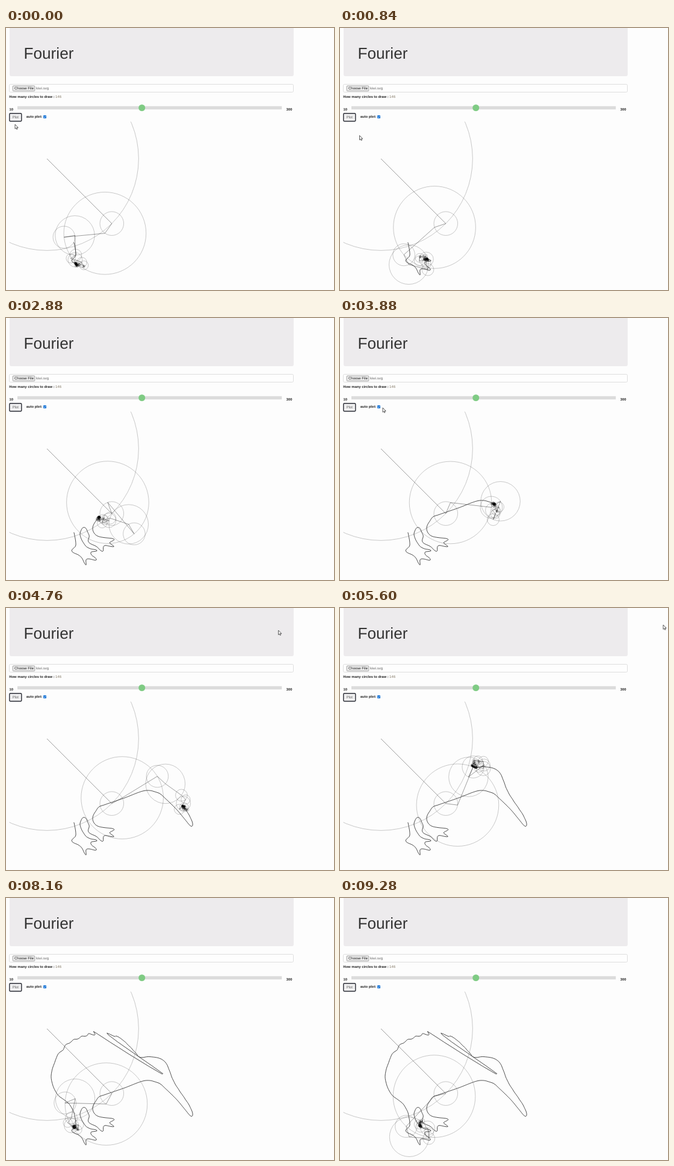
Animation, 545 px wide and 435 px high, one loop 9320 ms. Source, as an HTML page with a canvas:

```html
<!DOCTYPE html>
<html lang="en">
<head>
<meta charset="utf-8">
<title>Fourier</title>
<style>
  html, body { margin: 0; width: 100%; height: 100%; overflow: hidden; background: #fdfdfd; }
  canvas, svg { position: absolute; left: 0; top: 0; }
  text { font: 6px "Liberation Sans", Arial, sans-serif; fill: #333; text-rendering: geometricPrecision; }
  .bold { font-weight: bold; font-size: 5.85px; fill: #222; }
</style>
</head>
<body>
<canvas id="plot" width="545" height="435"></canvas>
<svg width="545" height="435" viewBox="0 0 545 435">
  <path d="M6 0H478V77a3 3 0 0 1 -3 3H9a3 3 0 0 1 -3 -3Z" fill="#edebed"/>
  <text x="29.5" y="51.2" style="font-size:26.2px">Fourier</text>

  <rect x="5.5" y="93.5" width="472" height="13" rx="2" fill="#fefefe" stroke="#dedede"/>
  <rect x="11.3" y="96" width="36.5" height="8.6" rx="1" fill="#efefef" stroke="#8a8a8a" stroke-width=".8"/>
  <text x="14" y="102.3" style="fill:#111">Choose File</text>
  <text x="50" y="102.3" style="fill:#666">kiwi.svg</text>

  <text class="bold" x="5.3" y="116.2">How many circles to draw :</text>
  <text x="82" y="116" style="fill:#857a68">146</text>
  <text class="bold" x="5.5" y="137">10</text>
  <text class="bold" x="465.7" y="137">300</text>
  <rect x="19" y="129.8" width="439.3" height="5.4" fill="#dcdcdc"/>
  <circle cx="225.8" cy="132.5" r="5.5" fill="#7fcb84"/>

  <rect x="5.8" y="141.8" width="20" height="13" rx="1.5" fill="#efeff0" stroke="#2b2d36" stroke-width="1.4"/>
  <text x="10.7" y="150.3" style="fill:#666">Plot</text>
  <text class="bold" x="33.7" y="149">auto plot:</text>
  <rect x="62" y="145" width="5" height="5" rx=".8" fill="#1673d6"/>
  <path d="M63 147.5l1.1 1.2 1.9 -2.4" fill="none" stroke="#fff" stroke-width=".8"/>

  <path id="cursor" d="M0 0V7.4L1.7 5.9 2.8 8.3 4 7.7 2.9 5.4H5.2Z" fill="#fff" stroke="#333" stroke-width=".8"/>
</svg>
<script>
const LOOP = 9320, FRAME = 40, PERIOD = 8320, START = -390, STEP = 20, CIRCLES = 146;
const ORIGIN = [68, 217];
const ctx = document.getElementById('plot').getContext('2d');
const cursor = document.getElementById('cursor');

const lerp = (a, b, u) => a.map((v, i) => v + (b[i] - v) * u);
const parse = text => text.split(' ').map(p => p.split(',').map(Number));

// Catmull-Rom curve through the points, u from 0 to 1.
function spline(pts, u) {
  const last = pts.length - 1;
  const i = Math.min(Math.floor(u * last), last - 1), f = u * last - i;
  const [a, b, c, d] = [-1, 0, 1, 2].map(k => pts[Math.min(Math.max(i + k, 0), last)]);
  return b.map((v, n) => v + f / 2 * (c[n] - a[n]
    + f * (2 * a[n] - 5 * v + 4 * c[n] - d[n] + f * (3 * (v - c[n]) + d[n] - a[n]))));
}

// One stretch of the bird, drawn at even speed until the given time.
function stretch(until, text, waves = 0) {
  const keys = parse(text), count = keys.length * 10;
  const pts = Array.from({ length: count + 1 }, (_, i) => {
    const [x, y] = spline(keys, i / count);
    return [x, y + 1.7 * Math.sin(2 * Math.PI * waves * i / count)];
  });
  const reach = [0];
  for (let i = 1; i <= count; i++)
    reach.push(reach[i - 1] + Math.hypot(pts[i][0] - pts[i - 1][0], pts[i][1] - pts[i - 1][1]));
  return { until, pts, reach };
}

const bird = [
  // left foot, right foot
  stretch(1680, '113,356 116,377 109,387 124,396 133,411 134,400 151,402 140,390 152,386 134,380 123,360 130,347 138,361 137,372 150,379'),
  stretch(2880, '150,379 161,388 163,378 180,380 172,373 180,367 152,362 144,348 154,330'),
  // belly, beak and head, neck
  stretch(3880, '154,330 195,316 232,303 256,308'),
  stretch(5600, '256,308 283,334 308,363 306,347 280,307 265,273 245,264 222,265'),
  stretch(6230, '222,265 206,247 187,231 166,227'),
  // wing tip, feathered back, rump
  stretch(6340, '251,283 243,285'),
  stretch(7120, '155,226 140,226 122,232 104,241 85,262', 6),
  stretch(PERIOD + START, '85,262 75,295 84,324 104,341 113,356')
];

function birdAt(t) {
  const n = bird.findIndex(s => t < s.until), { until, pts, reach } = bird[n];
  const from = n ? bird[n - 1].until : START;
  const d = (t - from) / (until - from) * reach[reach.length - 1];
  const i = Math.max(1, reach.findIndex(r => r >= d));
  return lerp(pts[i - 1], pts[i], (d - reach[i - 1]) / (reach[i] - reach[i - 1]));
}

const samples = Array.from({ length: 832 }, (_, i) => {
  const t = START + i * PERIOD / 832, [x, y] = birdAt(t);
  return { t, x: x - ORIGIN[0], y: y - ORIGIN[1] };
});

// Fourier terms in the order 0, 1, -1, 2, -2, ...
const terms = Array.from({ length: CIRCLES }, (_, n) => {
  const w = (n % 2 ? 1 : -1) * Math.ceil(n / 2) * 2 * Math.PI / PERIOD;
  let re = 0, im = 0;
  for (const { t, x, y } of samples) {
    const c = Math.cos(w * t), s = Math.sin(w * t);
    re += x * c + y * s;
    im += y * c - x * s;
  }
  return { w, r: Math.hypot(re, im) / samples.length, phase: Math.atan2(im, re) };
});

function chainAt(t) {
  let [x, y] = ORIGIN;
  const joints = [ORIGIN];
  for (const { w, r, phase } of terms) {
    x += r * Math.cos(w * t + phase);
    y += r * Math.sin(w * t + phase);
    joints.push([x, y]);
  }
  return joints;
}

const trace = Array.from({ length: PERIOD / STEP + 1 }, (_, i) => chainAt(START + i * STEP)[CIRCLES]);

function polyline(pts, color, width) {
  ctx.beginPath();
  pts.forEach(p => ctx.lineTo(...p));
  ctx.strokeStyle = color;
  ctx.lineWidth = width;
  ctx.stroke();
}

// Pointer visits as time, x, y.
const visits = ['0,15,160 1680,50,197 2240,19,215', '2920,-4,190 3880,71,149 4800,470,32 5600,537,28 5880,547,32']
  .map(parse);

function placeCursor(t) {
  const keys = visits.find(v => t >= v[0][0] && t < v[v.length - 1][0]);
  cursor.style.display = keys ? '' : 'none';
  if (!keys) return;
  const i = keys.findIndex(k => t < k[0]), a = keys[i - 1], b = keys[i];
  const [, x, y] = lerp(a, b, (t - a[0]) / (b[0] - a[0]));
  cursor.setAttribute('transform', `translate(${x} ${y})`);
}

function draw(t) {
  const joints = chainAt(t);
  ctx.clearRect(0, 0, 545, 435);
  ctx.save();
  ctx.beginPath();
  ctx.rect(5.5, 155.5, 540, 280);
  ctx.clip();
  ctx.lineJoin = 'round';
  ctx.strokeStyle = 'rgba(0,0,0,.36)';
  ctx.lineWidth = .6;
  terms.forEach(({ r }, i) => {
    ctx.beginPath();
    ctx.arc(...joints[i], r, 0, 2 * Math.PI);
    ctx.stroke();
  });
  polyline(joints, 'rgba(0,0,0,.55)', .7);
  polyline(trace.slice(0, (t - START) / STEP + 1), '#383838', .9);
  ctx.restore();
  placeCursor(t);
}

function tick() {
  const t = performance.now() % LOOP;
  draw(Math.floor(t / FRAME) * FRAME);
  requestAnimationFrame(tick);
}
tick();
</script>
</body>
</html>
```
